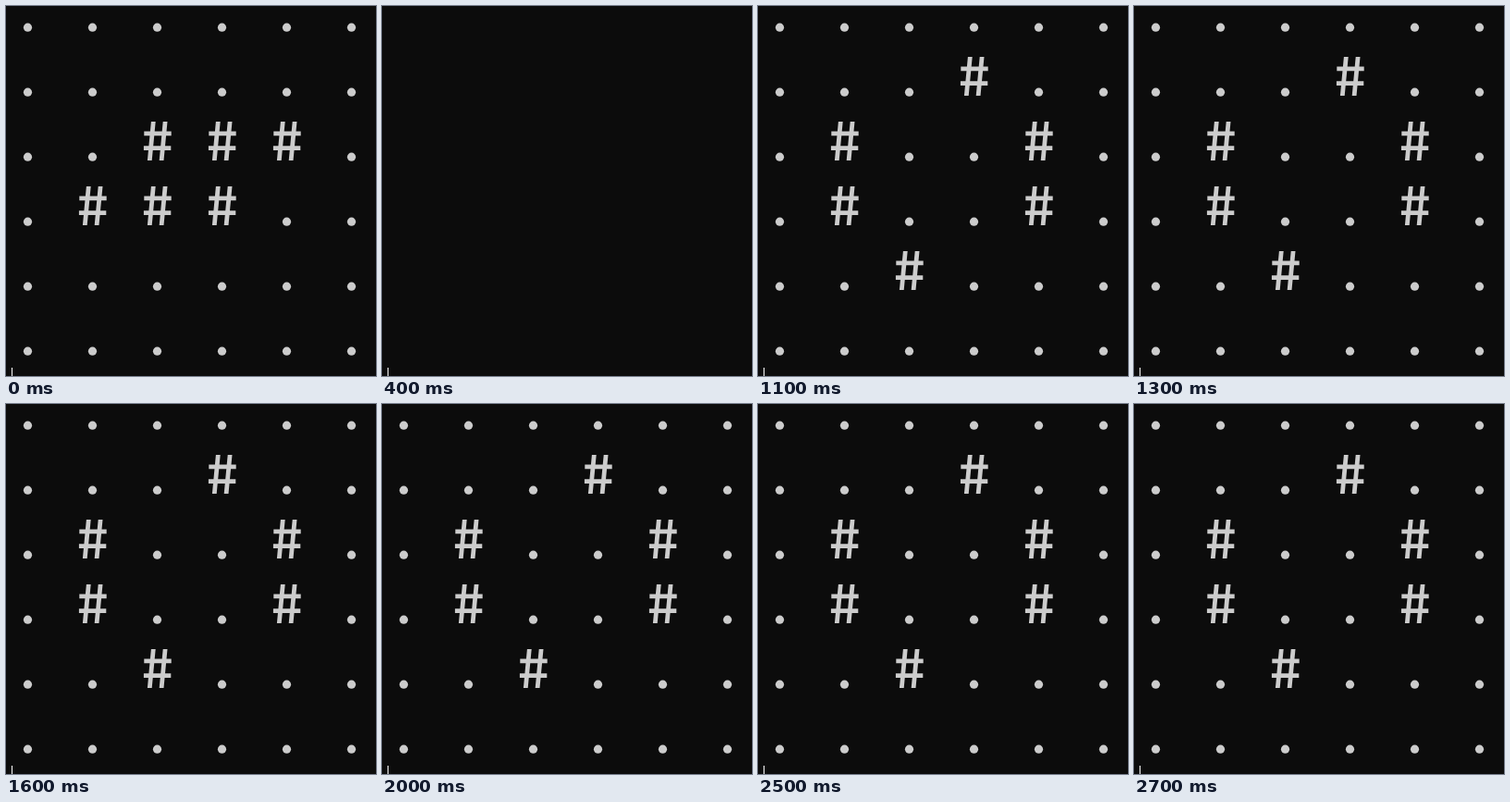
An HTML page for the animation above (2.8 s loop, 400 px wide and 400 px high).

```html
<!DOCTYPE html>
<html lang="en">
<head>
<meta charset="utf-8">
<title>Toad oscillator</title>
<style>
  html, body { margin: 0; width: 100%; height: 100%; overflow: hidden; background: #0c0c0c; }
  svg { display: block; width: 100%; height: 100%; }
</style>
</head>
<body>
<svg viewBox="0 0 400 400">
  <defs>
    <circle id="dead" cy=".2" r="4.6"/>
    <path id="live" d="M-6.6 -38h4.8l-4 42h-4.8zM6.2 -38h4.8l-4 42h-4.8zM-14.2 -27.4h29.4v4.7h-29.4zM-14.6 -11.7h29.4v4.7h-29.4z"/>
  </defs>
  <rect width="400" height="400" fill="#0c0c0c"/>
  <g id="board" fill="#ccc"></g>
  <rect x="6" y="391" width="1" height="9" fill="#fff"/>
</svg>
<script>
  const SIZE = 6, PITCH = 70, TICK = 100;
  // One letter per tick: A and B are the two phases, _ is a cleared screen.
  const TICKS = "ABAB__BAB__BAB__BABAB__BABAB";
  const PHASES = {
    A: ["......", "......", "..###.", ".###..", "......", "......"],
    B: ["......", "...#..", ".#..#.", ".#..#.", "..#...", "......"]
  };
  const board = document.getElementById("board");

  function drawPhase(rows) {
    let out = "";
    for (let r = 0; r < SIZE; r++) {
      for (let c = 0; c < SIZE; c++) {
        const id = rows[r][c] === "#" ? "live" : "dead";
        out += `<use href="#${id}" x="${23.5 + c * PITCH}" y="${23 + r * PITCH}"/>`;
      }
    }
    return out;
  }

  const screens = { A: drawPhase(PHASES.A), B: drawPhase(PHASES.B), _: "" };
  let shown = null;

  function render(ms) {
    const key = TICKS[Math.floor(ms / TICK) % TICKS.length];
    if (key === shown) return;
    shown = key;
    board.innerHTML = screens[key];
  }

  const start = performance.now();
  function loop() {
    render(performance.now() - start);
    requestAnimationFrame(loop);
  }
  loop();
</script>
</body>
</html>
```
